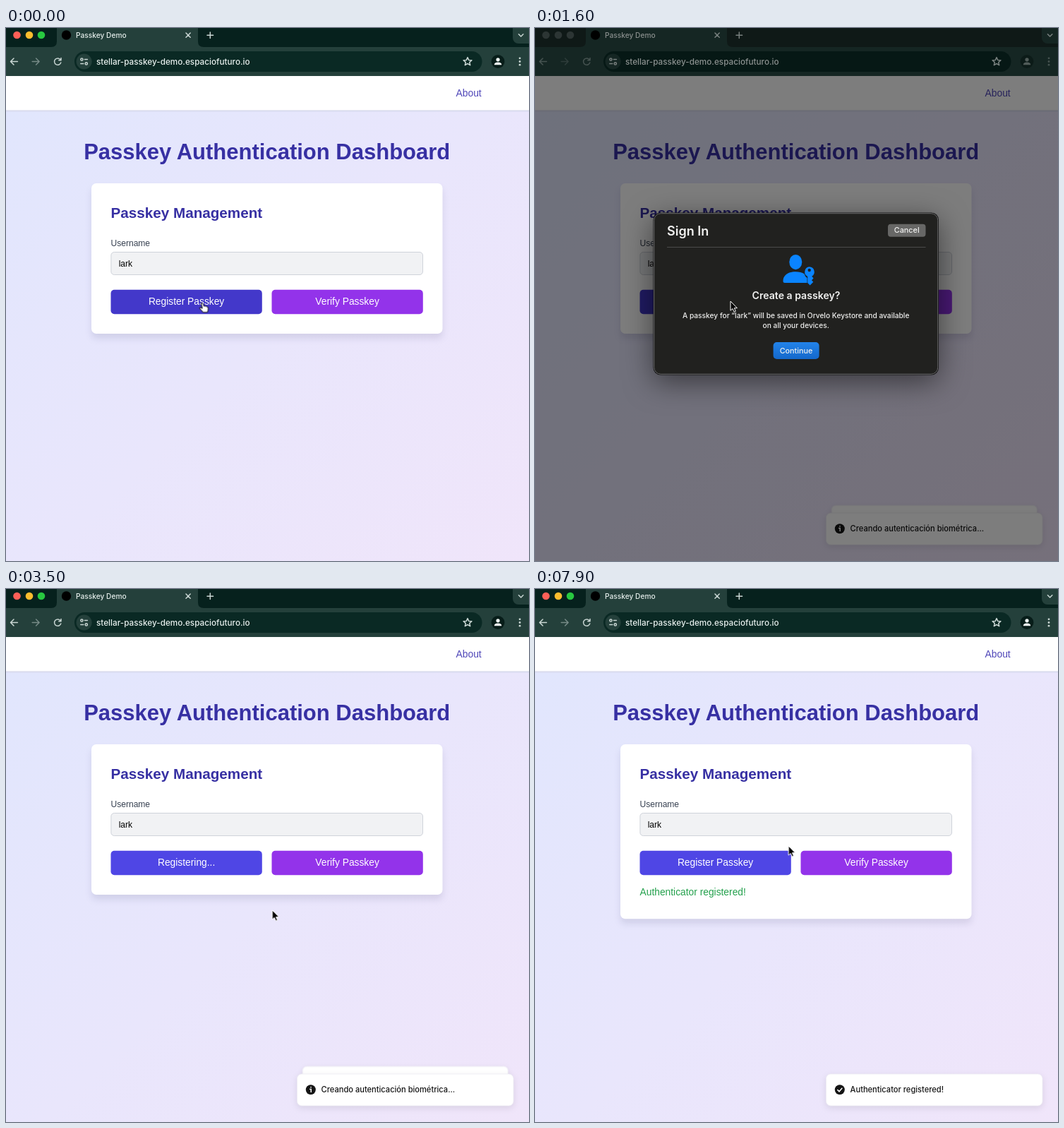
An HTML page that plays this animation: 741 px wide and 755 px high, repeating every 8 s.

```html
<!DOCTYPE html>
<html lang="en">
<head>
<meta charset="utf-8">
<title>Passkey Demo</title>
<style>
  html, body { margin: 0; width: 100%; height: 100%; overflow: hidden; background: #e6e6fc; }
  svg { display: block; width: 741px; height: 755px; font-family: "Liberation Sans", Arial, sans-serif; }
  .ui { font-family: Inter, Roboto, sans-serif; font-weight: 500; }
  .mid { text-anchor: middle; }
  .btn { font-size: 13.8px; fill: #fff; text-anchor: middle; }
  .line { fill: none; stroke: #c9d6d3; stroke-width: 1.5; stroke-linecap: round; stroke-linejoin: round; }
  .card { filter: drop-shadow(0 7px 5px rgba(20, 15, 70, .1)); }
  .box { fill: #fff; stroke: #ecebf3; stroke-width: .8; filter: drop-shadow(0 3px 5px rgba(0, 0, 0, .09)); }
  .toast { transform-origin: 565.5px 709.5px; font-size: 11.1px; fill: #151515; opacity: 0; }
  .sheet { filter: drop-shadow(0 10px 20px rgba(0, 0, 0, .5)); }
</style>
</head>
<body>
<svg viewBox="0 0 741 755">
  <defs>
    <linearGradient id="sky" gradientUnits="userSpaceOnUse" x1="25" y1="90" x2="715" y2="780">
      <stop offset="0" stop-color="#e1e6fd"/>
      <stop offset=".5" stop-color="#e9e6fc"/>
      <stop offset="1" stop-color="#f0e5fa"/>
    </linearGradient>
    <linearGradient id="blue" x2="0" y2="1">
      <stop offset="0" stop-color="#2283ea"/>
      <stop offset="1" stop-color="#1468cb"/>
    </linearGradient>
  </defs>

  <!-- page -->
  <rect width="741" height="755" fill="url(#sky)"/>
  <rect y="116" width="741" height="1" fill="#cfd2e4"/>
  <rect y="117" width="741" height="1.5" fill="#d9dcf0"/>
  <rect y="68" width="741" height="48.5" fill="#fff"/>
  <text x="637.6" y="97" font-size="13.8" fill="#4f46b8">About</text>
  <text class="mid" x="369.7" y="186" font-size="31" font-weight="700" fill="#3730a3">Passkey Authentication Dashboard</text>

  <rect id="card" class="card" x="121" y="220" width="497.5" height="213" rx="7" fill="#fff"/>
  <text x="148.5" y="269" font-size="20.67" font-weight="700" fill="#3730a3">Passkey Management</text>
  <text x="148.5" y="309.3" font-size="12.05" fill="#374151">Username</text>
  <rect x="148.9" y="317.5" width="441.6" height="32" rx="4.5" fill="#f1f2f4" stroke="#cfd3da"/>
  <text x="159.7" y="338" font-size="12.05" fill="#000">lark</text>
  <rect id="reg" x="148.5" y="370.8" width="214.3" height="34.4" rx="5" fill="#4f46e5"/>
  <rect x="376.5" y="370.8" width="214.3" height="34.4" rx="5" fill="#9333ea"/>
  <text id="idle" class="btn" x="255.6" y="392">Register Passkey</text>
  <text id="busy" class="btn" x="255.6" y="392" opacity="0">Registering...</text>
  <text class="btn" x="483.6" y="392">Verify Passkey</text>
  <text id="done" x="148.5" y="433.6" font-size="13.8" fill="#23a04c" opacity="0">Authenticator registered!</text>

  <!-- toasts -->
  <g id="toastA" class="toast ui">
    <rect class="box" x="412.4" y="687" width="306.6" height="45" rx="6.5"/>
    <g id="textA">
      <circle cx="431.8" cy="709.3" r="7"/>
      <path d="M430.6 708.6H432.2V712.6M432 705.6V706" stroke="#fff" stroke-width="1.5" fill="none" stroke-linecap="round"/>
      <text x="446.6" y="713.4">Creando autenticación biométrica...</text>
    </g>
  </g>
  <g id="toastB" class="toast ui">
    <rect class="box" x="412.4" y="687" width="306.6" height="45" rx="6.5"/>
    <g id="textB">
      <circle cx="431.8" cy="709.3" r="7"/>
      <path d="M430.6 708.6H432.2V712.6M432 705.6V706" stroke="#fff" stroke-width="1.5" fill="none" stroke-linecap="round"/>
      <text x="446.6" y="713.4">Creando autenticación biométrica...</text>
    </g>
  </g>
  <g id="toastC" class="toast ui">
    <rect class="box" x="412.4" y="687" width="306.6" height="45" rx="6.5"/>
    <circle cx="431.8" cy="709.3" r="7"/>
    <path d="M428.8 709.6L431 711.8L434.9 707.2" stroke="#fff" stroke-width="1.5" fill="none" stroke-linecap="round"/>
    <text x="446.6" y="713.4">Authenticator registered!</text>
  </g>

  <!-- browser bar -->
  <rect id="strip" width="741" height="30" fill="#06211d"/>
  <path d="M0 27H64Q72 27 72 19V0H272V19Q272 27 280 27H741V68H0Z" fill="#24403b"/>
  <rect x="718" y="-8" width="32" height="30" rx="8" fill="#24403b"/>
  <circle id="red" cx="15.5" cy="10" r="5.3" fill="#ff5f57"/>
  <g id="lamps">
    <circle cx="33" cy="10" r="5.3" fill="#febc2e"/>
    <circle cx="50" cy="10" r="5.3" fill="#28c840"/>
  </g>
  <g id="lampsOff" fill="#4a5957" opacity="0">
    <circle cx="33" cy="10" r="5.3"/>
    <circle cx="50" cy="10" r="5.3"/>
  </g>
  <circle cx="85.5" cy="10" r="6.7" fill="#000"/>
  <text class="ui" x="99" y="13.8" font-size="10.2" fill="#e6eeec">Passkey Demo</text>
  <path class="line" d="M255 7L261.2 13.2M261.2 7L255 13.2M285 10.3H293.6M289.3 6V14.6M726.4 8.8L729.6 12L732.8 8.8"/>
  <rect x="97" y="33" width="577.5" height="29" rx="14.5" fill="#0a2924"/>
  <circle cx="110.6" cy="47.5" r="11" fill="#24403b"/>
  <g class="line" stroke-width="1.4">
    <circle cx="107.4" cy="44.6" r="1.6"/>
    <circle cx="113.8" cy="50.4" r="1.6"/>
    <path d="M111.4 44.6H115.4M105.8 50.4H109.8"/>
  </g>
  <text class="ui" x="128" y="51.8" font-size="11.75" fill="#e8f0ee">stellar-passkey-demo.espaciofuturo.io</text>
  <path class="line" stroke-width="1.2" d="M654 41.6L655.7 45.4L659.9 45.8L656.7 48.6L657.7 52.7L654 50.5L650.3 52.7L651.3 48.6L648.1 45.8L652.3 45.4Z"/>
  <g id="nav">
    <path class="line" d="M16.4 47.5H6.6M11 43L6.5 47.5L11 52"/>
    <path class="line" opacity=".5" d="M37.2 47.5H47M42.6 43L47.1 47.5L42.6 52"/>
    <path class="line" d="M77.3 45.2A4.7 4.7 0 1 0 77.8 48.9M78 42.6V45.7H74.8"/>
    <circle cx="697" cy="47.5" r="9.4" fill="#071d19"/>
    <circle cx="697" cy="44.8" r="2.6" fill="#edf3f1"/>
    <path d="M691.8 52.2Q691.8 48.6 697 48.6T702.2 52.2Z" fill="#edf3f1"/>
    <g fill="#c9d6d3">
      <circle cx="728" cy="42.8" r="1.4"/>
      <circle cx="728" cy="47.5" r="1.4"/>
      <circle cx="728" cy="52.2" r="1.4"/>
    </g>
  </g>

  <!-- dialog -->
  <g id="shade" opacity="0">
    <rect width="741" height="68" fill="#000" opacity=".4"/>
    <rect y="68" width="741" height="687" fill="#000" opacity=".51"/>
  </g>
  <g id="modal" class="ui" opacity="0" fill="#f0f0ef">
    <rect class="sheet" x="167.5" y="261.5" width="404.5" height="230" rx="10.5" fill="#0c0c0c"/>
    <rect x="168.7" y="262.7" width="402" height="227.6" rx="9.5" fill="#21211f" stroke="#6c6c6d" stroke-width="1"/>
    <text x="187" y="293.8" font-size="18" font-weight="600">Sign In</text>
    <rect x="500" y="277.8" width="53.5" height="18" rx="4" fill="#676766"/>
    <text class="mid" x="526.7" y="290.4" font-size="10.8">Cancel</text>
    <path d="M187 310.5H553.5" stroke="#4b4b4a"/>
    <g fill="#0a84ff">
      <ellipse cx="369.3" cy="331.6" rx="9" ry="10.6"/>
      <path d="M351.5 358.5C351.5 350 359 345.2 369 345.2C374 345.2 378.600 346.200 381.500 348.200Q382.500 352 385.500 354V361H354Q351.500 361 351.500 358.500Z"/>
      <path fill-rule="evenodd" d="M388.7 338.3A7.2 7.2 0 0 1 392.200 351.700L394.600 354.500L392 357.200L394.300 359.800L389.600 364.400L386.200 361V351.900A7.2 7.2 0 0 1 388.700 338.300ZM388.700 340.800A2.200 2.200 0 1 0 388.700 345.200A2.200 2.200 0 1 0 388.700 340.800Z"/>
    </g>
    <text class="mid" x="370" y="384.4" font-size="14.1" font-weight="600">Create a passkey?</text>
    <g class="mid" font-size="10.2">
      <text x="369.7" y="411.2">A passkey for “lark” will be saved in Orvelo Keystore and available</text>
      <text x="369.7" y="425.2">on all your devices.</text>
    </g>
    <rect x="337.6" y="445" width="65" height="24" rx="5" fill="url(#blue)"/>
    <rect id="pressed" x="337.6" y="445" width="65" height="24" rx="5" fill="#6b6b6c" opacity="0"/>
    <text class="mid" x="370" y="460.7" font-size="10.8">Continue</text>
  </g>

  <!-- pointers -->
  <path id="hand" transform="translate(273.500 388.500)" fill="#fff" stroke="#000" stroke-width="1" stroke-linejoin="round"
    d="M3.200 1.600Q4.600 0 5.600 1.800L7 5.600Q8.500 4.400 9.300 5.900Q10.800 5 11.400 6.700Q13 6.300 13 8.400Q13.200 11.600 11.800 14.200H5.600Q4 11.400 1 9Q.2 7.400 2.200 7.400L4.600 8.700Z"/>
  <path id="arrow" opacity="0" fill="#000" stroke="#fff" stroke-width="1" stroke-linejoin="round"
    d="M0 0V13.200L3 10.500L5.100 15.200L7.300 14.200L5.300 9.700H9.400Z"/>
</svg>
<script>
const LOOP = 8000;
const WINDOW_OFF = 1200, WINDOW_ON = 3300, SUCCESS = 4200;

// steps: [time, value, easing]; equal times make a hard change
function anim(id, prop, steps) {
  const all = [[0, steps[0][1]], ...steps, [LOOP, steps[steps.length - 1][1]]];
  const frames = all.map(([t, value, easing = "linear"]) => ({ offset: t / LOOP, [prop]: value, easing }));
  document.getElementById(id).animate(frames, { duration: LOOP, iterations: Infinity });
}
const swap = (id, prop, base, other, from, to = LOOP) =>
  anim(id, prop, [[from, base], [from, other], [to, other], ...(to < LOOP ? [[to, base]] : [])]);
const move = (x, y) => `translate(${x}px, ${y}px)`;
const stack = (y, scale) => `translateY(${y}px) scale(${scale})`;
const LOW = stack(60, 1), FRONT = stack(0, 1), BACK = stack(-12, .95), FAR = stack(-24, .9);

// form
swap("idle", "opacity", 1, 0, 100, SUCCESS);
swap("busy", "opacity", 0, 1, 100, SUCCESS);
swap("done", "opacity", 0, 1, SUCCESS);
swap("card", "height", "213px", "247.300px", SUCCESS);
swap("reg", "fill", "#4338ca", "#4f46e5", WINDOW_ON);

// window focus
swap("strip", "fill", "#06211d", "#1a2a27", WINDOW_OFF, WINDOW_ON);
swap("nav", "opacity", 1, .5, WINDOW_OFF, WINDOW_ON);
swap("red", "fill", "#ff5f57", "#4a5957", WINDOW_OFF, WINDOW_ON);
swap("lamps", "opacity", 1, 0, 1450, 2800);
swap("lampsOff", "opacity", 0, 1, 1450, 2800);

// dialog
const fade = [[1350, 0], [1580, 1], [2790, 1], [3090, 0]];
anim("shade", "opacity", fade);
anim("modal", "opacity", fade);
anim("modal", "transform", [[1350, move(0, -31)], [1580, move(0, 0)], [2790, move(0, 0)], [3090, move(0, -31)]]);
swap("pressed", "opacity", 0, 1, 2700, 3200);

// toasts
anim("toastA", "transform", [[100, LOW, "ease"], [500, FRONT], [700, FRONT, "ease"], [1100, BACK], [SUCCESS, BACK, "ease"], [4600, FAR]]);
anim("toastA", "opacity", [[100, 0], [400, 1], [SUCCESS, 1], [4600, 0]]);
anim("textA", "opacity", [[700, 1], [1000, 0]]);
anim("toastB", "transform", [[700, LOW, "ease"], [1100, FRONT], [SUCCESS, FRONT, "ease"], [4600, BACK]]);
anim("toastB", "opacity", [[700, 0], [1000, 1], [4800, 1], [5050, 0]]);
anim("textB", "opacity", [[SUCCESS, 1], [4500, 0]]);
anim("toastC", "transform", [[SUCCESS, LOW, "ease"], [4600, FRONT]]);
anim("toastC", "opacity", [[SUCCESS, 0], [4500, 1]]);

// pointer
swap("hand", "opacity", 1, 0, 200);
swap("arrow", "opacity", 0, 1, 200);
anim("arrow", "transform", [
  [1900, move(277, 387), "ease-in-out"], [2300, move(377.300, 455)],
  [7550, move(377.300, 455), "ease-in-out"], [7900, move(359.200, 364)]
]);
</script>
</body>
</html>
```
